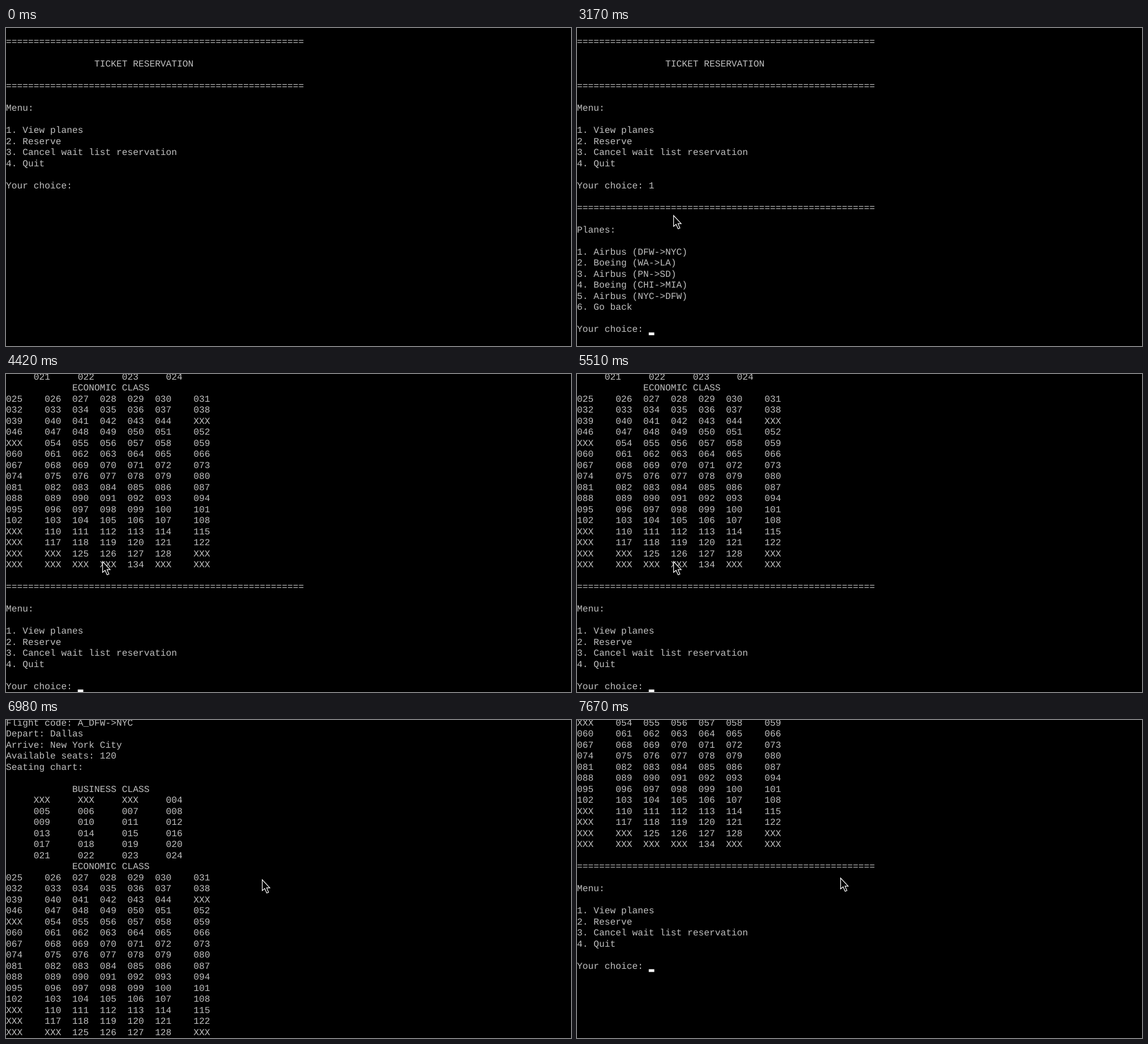
Write an HTML page that moves like this. It is 998 by 561 pixels and loops after 8 s.

```html
<!DOCTYPE html>
<html lang="en">
<head>
<meta charset="utf-8">
<title>Ticket reservation</title>
<style>
  html, body { margin: 0; width: 100%; height: 100%; overflow: hidden; background: #000; }
  #stage { position: absolute; left: 0; top: 0; width: 998px; height: 561px; overflow: hidden; }
  /* character cells are 10 x 20 before scaling */
  #term { position: absolute; left: 0; top: -4.2px; transform: scale(.975); transform-origin: 0 0; }
  #text {
    position: absolute; left: 0; top: 1.2px; margin: 0; white-space: pre; color: #c0c0c0;
    font: 16.6667px/20px "Liberation Mono", monospace;
    text-rendering: geometricPrecision; font-variant-ligatures: none;
  }
  #caret { position: absolute; width: 10px; height: 5px; background: #fff; }
  #mouse { position: absolute; left: 0; top: 0; width: 16px; height: 26px; overflow: visible; }
</style>
</head>
<body>
<div id="stage">
  <div id="term"><pre id="text"></pre><div id="caret"></div></div>
  <svg id="mouse" viewBox="0 0 16 26">
    <path d="M.6 .8V20L5 16.2L8.6 24.3L11.8 23L8.4 15.2H14Z" fill="#000" stroke="#fff" stroke-width="1.2"/>
  </svg>
</div>
<script>
const LOOP = 8000, ROWS = 29, BLINK = 530;
const $ = id => document.getElementById(id);
const rule = '='.repeat(54);
const indent = (n, s) => ' '.repeat(n) + s;
const menu = ['Menu:', '', '1. View planes', '2. Reserve',
  '3. Cancel wait list reservation', '4. Quit', '', 'Your choice: '];

const taken = n => n < 4 || n > 128 && n !== 134 || [45, 53, 109, 116, 123, 124].includes(n);
const seat = n => taken(n) ? 'XXX' : String(n).padStart(3, '0');

function seatRows(first, count, cols) {
  return Array.from({ length: count }, (_, r) => cols.reduce(
    (line, col, c) => line.padEnd(col) + seat(first + r * cols.length + c), ''));
}

const answer = (lines, key) => [...lines.slice(0, -1), lines.at(-1) + key];
const home = ['', rule, '', indent(16, 'TICKET RESERVATION'), '', rule, '', ...menu];
const picked = answer(home, '1');
const planes = [...picked, '', rule, '', 'Planes:', '',
  '1. Airbus (DFW->NYC)', '2. Boeing (WA->LA)', '3. Airbus (PN->SD)',
  '4. Boeing (CHI->MIA)', '5. Airbus (NYC->DFW)', '6. Go back', '', 'Your choice: '];
const chart = ['', rule, '', 'Plane type: Airbus', 'Flight code: A_DFW->NYC',
  'Depart: Dallas', 'Arrive: New York City', 'Available seats: 120', 'Seating chart:', '',
  indent(12, 'BUSINESS CLASS'), ...seatRows(1, 6, [5, 13, 21, 29]),
  indent(12, 'ECONOMIC CLASS'), ...seatRows(25, 16, [0, 7, 12, 17, 22, 27, 34]),
  '', rule, '', ...menu];
const printing = [...chart.slice(0, 28), '0'];

// time, lines, time from which the caret blinks (null: no caret)
const screens = [
  [0, home, null],
  [1300, home, 1270],
  [2940, picked, 2940],
  [3170, planes, 3340],
  [4100, answer(planes, '1'), 4100],
  [4330, printing, 4450],
  [4420, chart, 4450]
];

// wheel turns: time, direction; each scrolls six lines
const wheel = [[6430, -1], [6730, -1], [7440, 1], [7590, 1], [7670, 1]];

// pointer glides: start, end, steps, x, y
const glides = [
  [150, 460, 5, 186, 363],
  [610, 690, 2, 170, 330],
  [6040, 6430, 6, 443, 283],
  [6980, 7050, 2, 455, 280],
  [7280, 7360, 2, 465, 278]
];

function pointer(t) {
  let x = 1081, y = 599;
  for (const [start, end, steps, toX, toY] of glides) {
    if (t < start) break;
    const step = Math.min(steps, 1 + Math.floor((t - start) / (end - start) * (steps - 1)));
    const ease = 1 - (1 - step / steps) ** 2;
    x += (toX - x) * ease;
    y += (toY - y) * ease;
  }
  return [x, y];
}

function draw(t) {
  const [, lines, lit] = screens.findLast(s => s[0] <= t);
  const turns = wheel.filter(w => w[0] <= t).reduce((sum, w) => sum + w[1], 0);
  const top = Math.max(0, lines.length - ROWS) + 6 * turns;
  const on = lit !== null && Math.max(0, t - lit) % (2 * BLINK) < BLINK;
  const text = lines.slice(top, top + ROWS).join('\n');
  if ($('text').textContent !== text) $('text').textContent = text;

  const caret = $('caret').style;
  caret.left = lines.at(-1).length * 10 + 'px';
  caret.top = (lines.length - 1 - top) * 20 + 15 + 'px';
  caret.display = on ? 'block' : 'none';

  const [x, y] = pointer(t).map(Math.round);
  $('mouse').style.transform = `translate(${x}px, ${y}px)`;
}

const start = performance.now();
function tick() {
  draw((performance.now() - start) % LOOP);
  requestAnimationFrame(tick);
}
tick();
</script>
</body>
</html>
```
